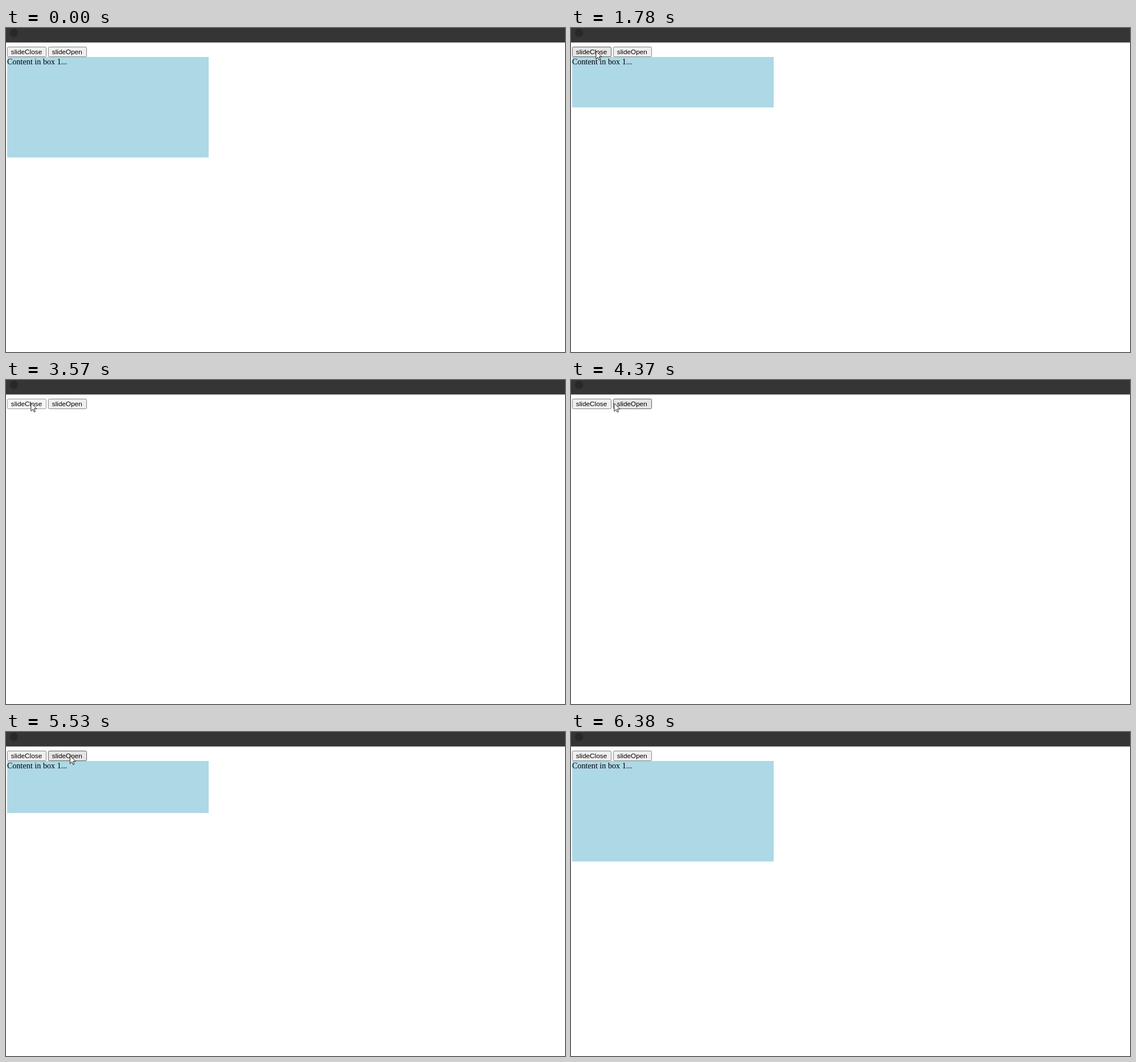
These frames come from a looping animation (982 px wide and 570 px high, 7400 ms). An HTML page:

```html
<!DOCTYPE html>
<html lang="en">
<head>
<meta charset="utf-8">
<title>Slide box</title>
<style>
  html, body { margin: 0; width: 100%; height: 100%; overflow: hidden; background: #fff; }
  svg { display: block; }
  .label { font: 11.8px "Liberation Sans", Arial, sans-serif; }
  .copy { font: 14.16px "Liberation Serif", "Times New Roman", serif; }
  .button { fill: #efefef; stroke: #767676; }
  .button.hover { fill: #e5e5e5; stroke: #4f4f4f; }
  .button.press { fill: #f5f5f5; stroke: #8d8d8d; }
</style>
</head>
<body>
<svg width="982" height="570" viewBox="0 0 982 570">
  <clipPath id="clip"><rect id="window" y="51" width="356"/></clipPath>
  <rect width="982" height="25.5" fill="#353535"/>
  <circle cx="14" cy="8.5" r="7.2" fill="#24292e"/>
  <g clip-path="url(#clip)">
    <rect x="2" y="51" width="354" height="177" fill="#add8e6"/>
    <text class="copy" x="2" y="64">Content in box 1...</text>
  </g>
  <rect class="button" x="2.4" y="33.4" width="68.2" height="17.2" rx="2" stroke-width=".9"/>
  <text class="label" x="8.8" y="46">slideClose</text>
  <rect class="button" x="74.4" y="33.4" width="67.2" height="17.2" rx="2" stroke-width=".9"/>
  <text class="label" x="80.8" y="46">slideOpen</text>
  <path id="cursor" d="M.5 .7V16.6L4.2 13L6.6 18.4L9 17.3L6.7 12H11.7Z" fill="#fff" stroke="#000"/>
</svg>
<script>
const LOOP = 7400;
const FULL = 176.7, SLIDE = 1000, CLOSE_AT = 1283, OPEN_AT = 5013;
const ENTER = 70, LEAVE = 6380;
const PRESSES = [1210, 3570, 4910], HOLD = 140;

const corner = { x: 829, y: 536 };
const moves = [
  { from: ENTER, to: 210, x: 341, y: 218 },
  { from: 400, to: 830, x: 43.5, y: 40 },
  { from: 4290, to: 4590, x: 112, y: 41 },
  { from: 5570, to: 5770, x: 762, y: 307 },
  { from: 5770, to: 6230, ...corner }
];

const progress = (t, from, to) => Math.max(0, Math.min(1, (t - from) / (to - from)));
const easeOut = p => 1 - (1 - p) ** 2;

const box = document.getElementById("window");
const cursor = document.getElementById("cursor");
const buttons = [...document.querySelectorAll(".button")].map(el => ({ el, area: el.getBBox() }));

function pointer(t) {
  let { x, y } = corner;
  for (const move of moves) {
    const p = easeOut(progress(t, move.from, move.to));
    x += (move.x - x) * p;
    y += (move.y - y) * p;
  }
  return { x, y };
}

function boxHeight(t) {
  const closed = progress(t, CLOSE_AT, CLOSE_AT + SLIDE);
  const opened = progress(t, OPEN_AT, OPEN_AT + SLIDE);
  return FULL * (1 - closed + opened);
}

const inside = ({ x, y }, a) =>
  x >= a.x && x < a.x + a.width && y >= a.y && y < a.y + a.height;

function draw(t) {
  const tip = pointer(t);
  const visible = t >= ENTER && t < LEAVE;
  const pressed = PRESSES.some(at => t >= at && t < at + HOLD);

  box.setAttribute("height", boxHeight(t));
  cursor.setAttribute("visibility", visible ? "visible" : "hidden");
  cursor.setAttribute("transform", `translate(${tip.x} ${tip.y}) scale(.885)`);

  for (const { el, area } of buttons) {
    const over = visible && inside(tip, area);
    el.classList.toggle("hover", over && !pressed);
    el.classList.toggle("press", over && pressed);
  }
}

const begin = performance.now();
function frame() {
  draw((performance.now() - begin) % LOOP);
  requestAnimationFrame(frame);
}
frame();
</script>
</body>
</html>
```
